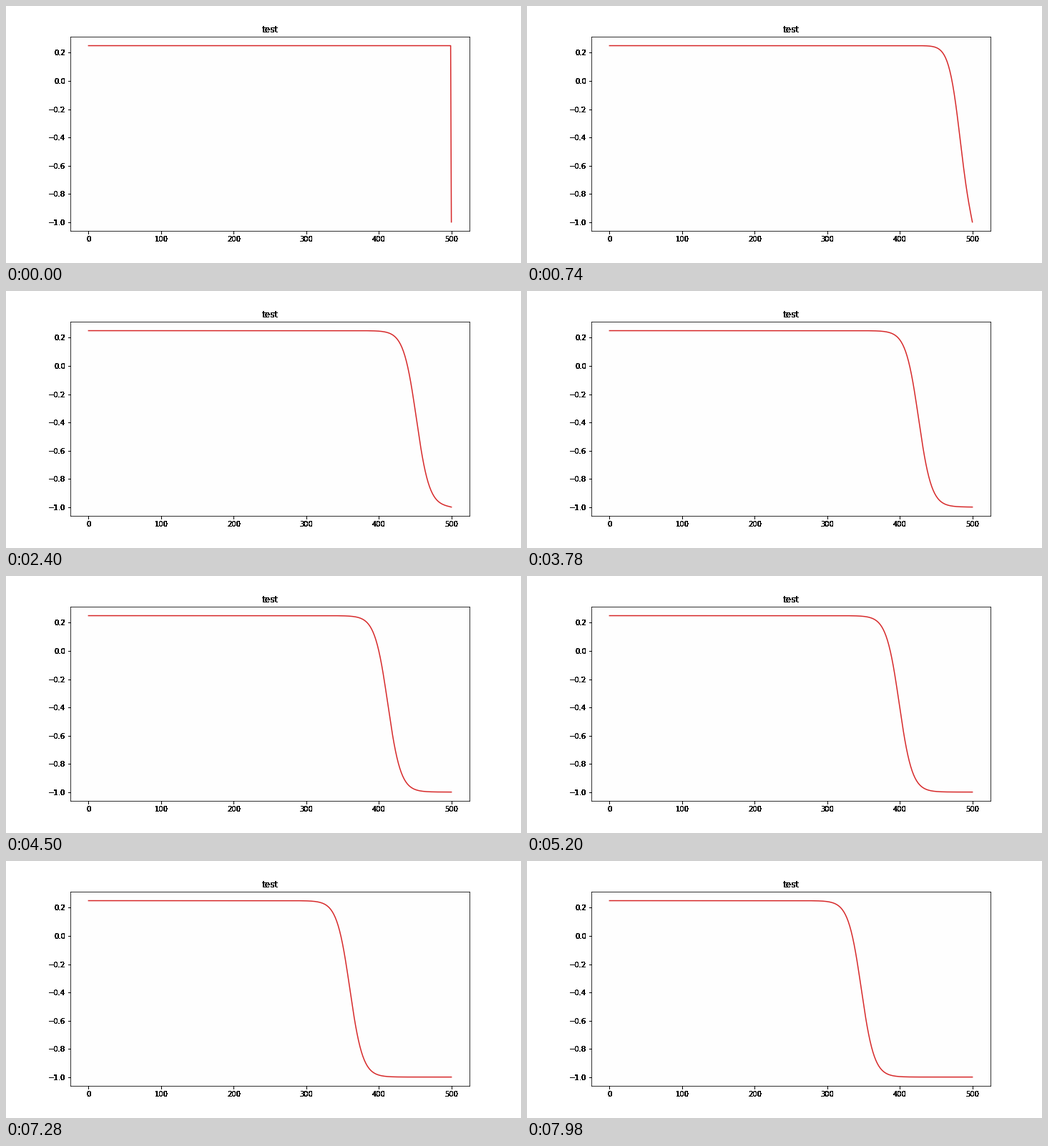
Write a matplotlib script that moves like this. It is 720 px wide and 360 px high and loops after 8000 ms.

```python
import numpy as np
import matplotlib.pyplot as plt
from matplotlib.animation import FuncAnimation

FRAMES, INTERVAL = 400, 20
HIGH, LOW = 0.25, -1.0      # the two stable states
DIFFUSION, RATE = 5.6, 0.09  # per frame
SUBSTEPS = 20


def travelling_front(n=501):
    """Bistable reaction-diffusion front with fixed ends, one row per frame."""
    u = np.full(n, HIGH)
    u[-1] = LOW
    dt = 1 / SUBSTEPS
    rows = [u.copy()]
    for _ in range(FRAMES - 1):
        for _ in range(SUBSTEPS):
            v = u[1:-1]
            spread = DIFFUSION * (u[2:] - 2 * v + u[:-2])
            react = RATE * v * (v - LOW) * (HIGH - v)
            u[1:-1] = v + dt * (spread + react)
        rows.append(u.copy())
    return rows


def harden(image, dpi):
    """Turn soft edges into solid ones."""
    out = image.copy()
    out[..., 3] = image[..., 3] > 0.12
    return out, 0, 0


plt.rcParams["font.family"] = "DejaVu Sans"
fig = plt.figure(figsize=(10, 5), dpi=72, facecolor="white")
fig.subplots_adjust(left=0.125, right=0.9, bottom=0.125, top=0.88)
ax = fig.add_subplot(facecolor="#fefefe")
title = ax.set_title("test")
for artist in (title, ax.xaxis, ax.yaxis):
    artist.set_agg_filter(harden)

states = travelling_front()
line, = ax.plot(states[0], color="tab:red", lw=1.5)
ax.set_xlim(-25, 525)
ax.set_ylim(-1.0625, 0.3125)


def update(frame):
    line.set_ydata(states[frame])
    return line,


anim = FuncAnimation(fig, update, frames=FRAMES, interval=INTERVAL,
                     repeat=True, repeat_delay=0)
plt.show()
```
